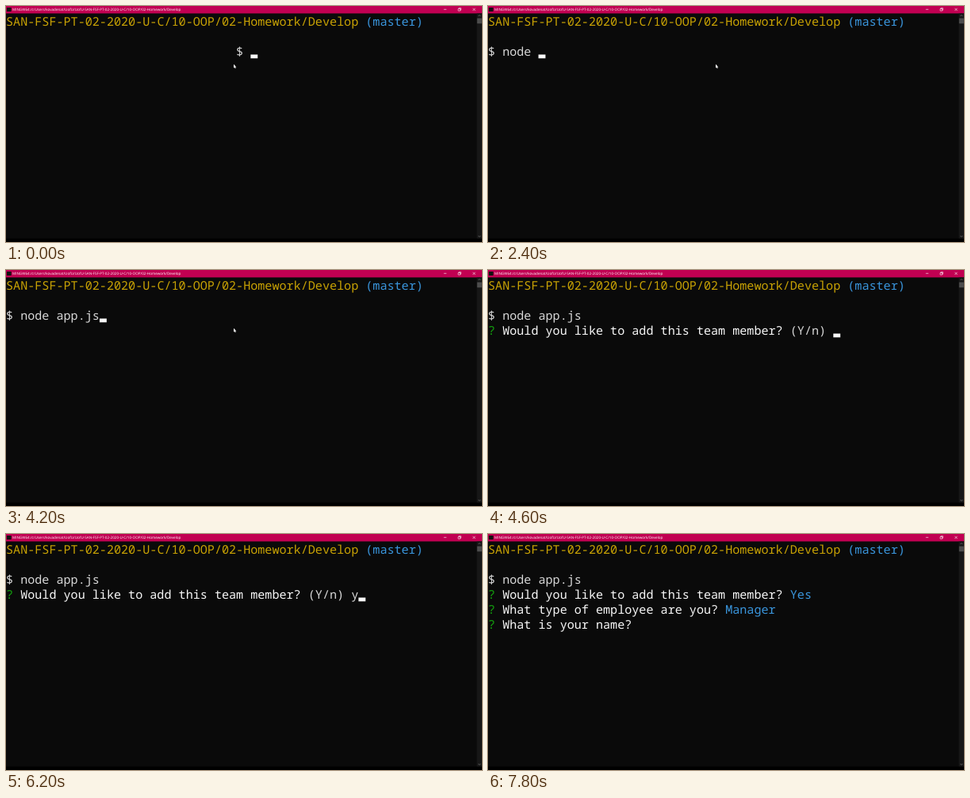
Recreate the animation shown at these times as an HTML page. Size 600x299 px, loop 8 s.

```html
<!DOCTYPE html>
<html lang="en">
<head>
<meta charset="utf-8">
<title>Terminal session</title>
<style>
  html, body { margin: 0; width: 100%; height: 100%; overflow: hidden; background: #000; }
  svg { display: block; width: 100%; height: 100%; }
  text { white-space: pre; text-rendering: geometricPrecision; }
  #screen text { font: 500 15.11px "Noto Sans Mono", monospace; }
  .title { font: 4.58px "Open Sans", sans-serif; fill: #fff; }
</style>
</head>
<body>
<svg viewBox="0 0 600 299">
  <rect width="600" height="294.5" fill="#0a0a0a"/>
  <rect width="600" height="9.4" fill="#c10052"/>
  <rect x="1" y="2" width="5.6" height="5" fill="#111"/>
  <text class="title" x="8" y="6.2">MINGW64:/c/Users/kovadenat/UofU/UofU-SAN-FSF-PT-02-2020-U-C/10-OOP/02-Homework/Develop</text>
  <path d="M551.8 4.3h3.4M570 3.5h2.6v2.6h-2.6zM570.8 3.4v-.8h2.6v2.6h-.7M588.4 2.8l3.2 3.2m0-3.2l-3.2 3.2" fill="none" stroke="#fff" stroke-width=".6"/>
  <rect x="593.5" y="9.4" width="6.5" height="285.1" fill="#171717"/>
  <rect x="593.8" y="15.5" width="6" height="6.7" fill="#4d4d4d"/>
  <path d="M595.3 13l1.5-1.5 1.5 1.5M595.3 291l1.5 1.5 1.5-1.5" fill="none" stroke="#777" stroke-width=".7"/>
  <g id="screen"></g>
  <path id="pointer" d="M287 73.8v4.8l1.1-.9.8 1.6.8-.4-.7-1.5h1.4z" fill="#fff"/>
</svg>
<script>
const LOOP = 8000, CELL = 9.066, LINE = 19.05, BASELINE = 24.7;
const GOLD = '#c8a204', BLUE = '#3a96dd', GREEN = '#13a10e', WHITE = '#f8f8f8', GREY = '#d8d8d8';
const ADD = 'Would you like to add this team member?';
const KIND = 'What type of employee are you?';

const screen = document.getElementById('screen');
const pointer = document.getElementById('pointer');

// Each part is [column, row, text, colour].
const path = [
  [0, 0, 'SAN-FSF-PT-02-2020-U-C/10-OOP/02-Homework/Develop', GOLD],
  [50, 0, '(master)', BLUE]
];
const prompt = (typed, col = 0) => [[col, 2, '$ ' + typed, GREY]];
const question = (row, label, answer, color) => [
  [0, row, '?', GREEN],
  [2, row, label, WHITE],
  [3 + label.length, row, answer, color]
];
const command = prompt('node app.js');
const confirmed = [...command, ...question(3, ADD, 'Yes', BLUE)];

const scenes = [];
const scene = (time, parts, cursor) => scenes.push({ time, parts, cursor });
const type = (time, typed) => scene(time, prompt(typed), [2 + typed.length, 2]);

scene(0, prompt('', 32), [34, 2]);
type(200, '');
type(400, 'n');
type(600, 'no');
type(800, 'nod');
type(1000, 'node');
type(2000, 'node ');
type(3000, 'node a');
type(3200, 'node ap');
type(3400, 'node app.');
type(3600, 'node app.j');
type(3800, 'node app.js');
scene(4400, command, [0, 3]);
scene(4600, [...command, ...question(3, ADD, '(Y/n)', GREY)], [48, 3]);
scene(6000, [...command, ...question(3, ADD, '(Y/n) y', GREY)], [49, 3]);
scene(6600, [
  ...confirmed,
  ...question(4, KIND, '(Use arrow keys)', GREY),
  [0, 5, '> Manager', BLUE],
  [2, 6, 'Intern', GREY],
  [2, 7, 'Engineer', GREY]
]);
scene(7400, [
  ...confirmed,
  ...question(4, KIND, 'Manager', BLUE),
  ...question(5, 'What is your name?', '', GREY)
]);

const textMarkup = ([col, row, text, color]) =>
  `<text x="${col * CELL}" y="${BASELINE + row * LINE}" fill="${color}">${text.replace('>', '&gt;')}</text>`;
const cursorMarkup = ([col, row]) =>
  `<rect x="${col * CELL + .1}" y="${BASELINE + row * LINE - 1.3}" width="8.9" height="4.8" fill="${WHITE}"/>`;

let shown;
function draw(now) {
  const time = now % LOOP;
  const current = scenes.findLast(s => s.time <= time);
  if (current !== shown) {
    shown = current;
    screen.innerHTML = [...path, ...current.parts].map(textMarkup).join('') +
      (current.cursor ? cursorMarkup(current.cursor) : '');
    pointer.style.display = current.time < 4400 ? '' : 'none';
  }
}

const start = performance.now();
function tick() {
  draw(performance.now() - start);
  requestAnimationFrame(tick);
}
tick();
</script>
</body>
</html>
```
